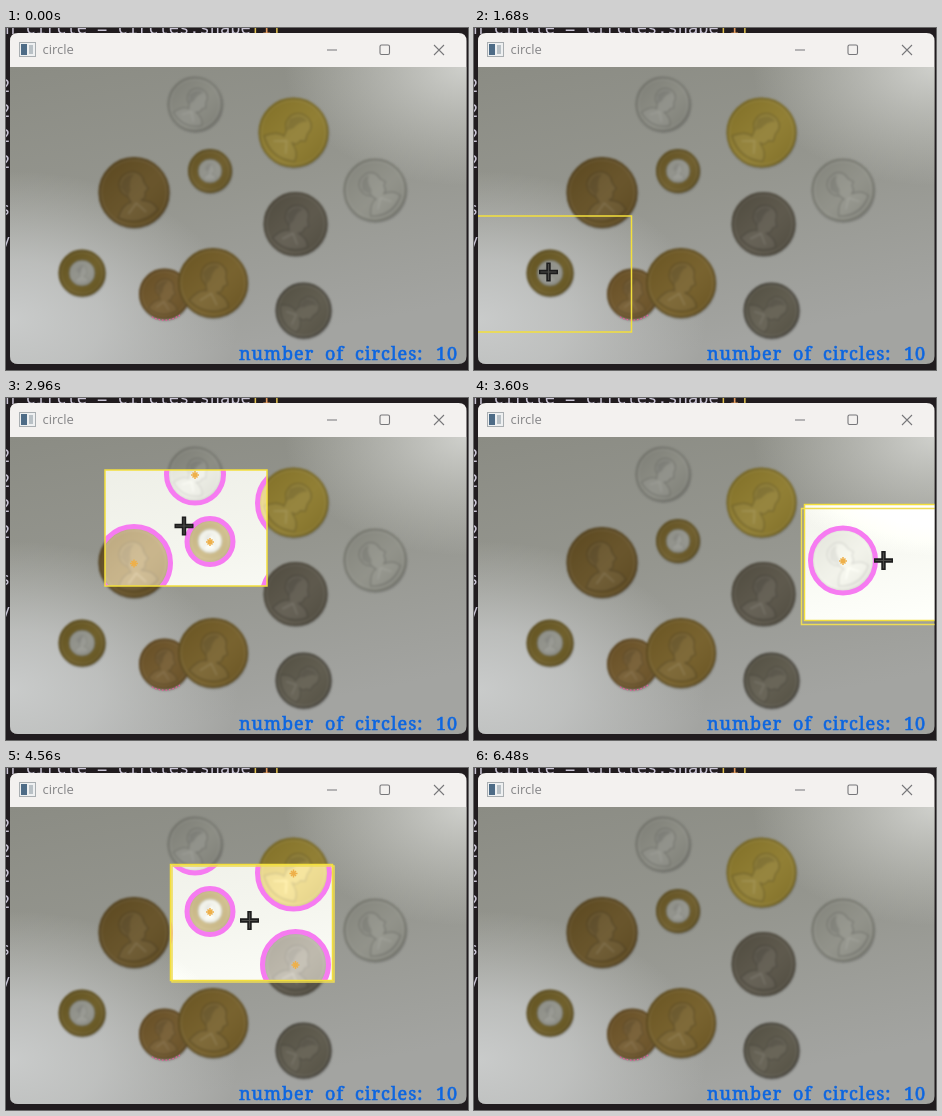
These frames come from a looping animation (462 by 342 pixels, 7.36 s). An HTML page:

```html
<!DOCTYPE html>
<html lang="en">
<head>
<meta charset="utf-8">
<title>circle</title>
<style>
  html, body { margin: 0; width: 100%; height: 100%; overflow: hidden; background: #211c1f; }
  svg { display: block; width: 462px; height: 342px; }
  .code { font: 17px "DejaVu Sans Mono", monospace; fill: #c9c4d4; white-space: pre; }
  .title { font: 13px "Open Sans", sans-serif; fill: #858587; }
  .count { font: 18px "Noto Serif", serif; letter-spacing: 1px; fill: #0d66e0; stroke: #0d66e0; stroke-width: .6px; }
</style>
</head>
<body>
<svg viewBox="0 0 462 342">
  <defs>
    <linearGradient id="paper" x1="0" y1="0" x2=".3" y2="1">
      <stop offset="0" stop-color="#8b8c84"/>
      <stop offset=".5" stop-color="#95968f"/>
      <stop offset="1" stop-color="#a3a4a1"/>
    </linearGradient>
    <radialGradient id="glow" cx="0" cy=".85" r=".5">
      <stop offset="0" stop-color="#ced0d0" stop-opacity=".9"/>
      <stop offset=".4" stop-color="#ced0d0" stop-opacity=".65"/>
      <stop offset="1" stop-color="#ced0d0" stop-opacity="0"/>
    </radialGradient>
    <radialGradient id="corner" cx="1" cy="0" r=".4">
      <stop offset="0" stop-color="#d2d3cf" stop-opacity=".95"/>
      <stop offset=".4" stop-color="#d2d3cf" stop-opacity=".55"/>
      <stop offset="1" stop-color="#d2d3cf" stop-opacity="0"/>
    </radialGradient>
    <linearGradient id="sheen" x1="0" y1="0" x2="1" y2="1">
      <stop offset="0" stop-color="#000" stop-opacity=".08"/>
      <stop offset=".55" stop-color="#fff" stop-opacity=".06"/>
      <stop offset="1" stop-color="#000" stop-opacity=".1"/>
    </linearGradient>
    <filter id="bright" x="0" y="0" width="1" height="1" color-interpolation-filters="sRGB">
      <feComponentTransfer>
        <feFuncR type="linear" slope="1" intercept=".38"/>
        <feFuncG type="linear" slope="1" intercept=".38"/>
        <feFuncB type="linear" slope="1" intercept=".38"/>
      </feComponentTransfer>
    </filter>
    <filter id="soft" color-interpolation-filters="sRGB"><feGaussianBlur stdDeviation="1"/></filter>
    <clipPath id="view"><path d="M4 39H460.500V328Q460.500 336 452 336H12Q4 336 4 328Z"/></clipPath>
    <clipPath id="lensClip"><rect id="lensArea" width="162" height="116"/></clipPath>
  </defs>

  <rect width="462" height="342" fill="#211c1f"/>
  <text class="code" x="-1" y="6">n circle = circles.shape<tspan fill="#e0c050">[</tspan><tspan fill="#e39a5c">1</tspan><tspan fill="#e0c050">]</tspan></text>
  <g id="margin" class="code"></g>

  <path d="M4 39V13Q4 5 12 5H452.500Q460.500 5 460.500 13V39Z" fill="#f3f1ef"/>
  <g>
    <rect x="13.500" y="14.500" width="16" height="14" fill="#eef0f1" stroke="#a9aeb1"/>
    <rect x="15" y="16" width="6" height="11" fill="#4d6b86"/>
    <rect x="23" y="17" width="4" height="9" fill="#b9c1c6"/>
  </g>
  <text class="title" x="36.500" y="26">circle</text>
  <path d="M321 22H331M428 17L438 27M438 17L428 27" fill="none" stroke="#77777a" stroke-width="1.100"/>
  <rect x="374" y="17" width="9.500" height="9.500" rx="1.500" fill="none" stroke="#77777a" stroke-width="1.100"/>

  <g clip-path="url(#view)">
    <g id="photo">
      <rect x="4" y="39" width="457" height="297" fill="url(#paper)"/>
      <rect x="4" y="39" width="457" height="297" fill="url(#glow)"/>
      <rect x="4" y="39" width="457" height="297" fill="url(#corner)"/>
      <g id="coins" filter="url(#soft)"></g>
      <path d="M146 289A26 26 0 0 0 174 287" fill="none" stroke="#e45a9c" stroke-width="1.300" stroke-dasharray="1.500 2"/>
    </g>
    <g id="lens">
      <g id="found" clip-path="url(#lensClip)">
        <use href="#photo" filter="url(#bright)"/>
        <g id="rings"></g>
      </g>
      <rect id="echo" width="162" height="116" fill="none" stroke="#eedc55" stroke-width="1.500"/>
      <rect id="frame" width="162" height="116" fill="none" stroke="#f3df3c" stroke-width="1.500"/>
    </g>
    <text class="count" y="332"><tspan x="233">number</tspan><tspan x="319">of</tspan><tspan x="349">circles:</tspan><tspan x="430">10</tspan></text>
    <g id="cursor" fill="none">
      <path d="M-9.500 0H9.500M0-9.500V9.500" stroke="#1d1d1d" stroke-width="4.400"/>
      <path d="M-8 0H8M0-8V8" stroke="#4b4b48" stroke-width="1.200"/>
    </g>
  </g>
</svg>

<script>
const LOOP = 7360, STEP = 80;
const $ = id => document.getElementById(id);

// x, y, radius, metal, rim, tilt of the relief, inner disc radius
const coins = [
  [189, 76, 27.5, '#85867d', '#74756d', 25, 0],
  [287.5, 104.5, 35, '#8a7728', '#76651f', 40, 0],
  [204, 143, 22, '#675522', '#5a4a1c', 0, 12],
  [128, 164.5, 35.5, '#604b1f', '#513e19', -12, 0],
  [369, 162, 31.5, '#8b8c83', '#77786f', -35, 0],
  [289.5, 196, 32, '#544f42', '#494438', 15, 0],
  [76, 245, 23.5, '#67561f', '#594918', 0, 13],
  [158.5, 266, 25.5, '#6b5124', '#59411a', 5, 0],
  [207, 255, 35, '#705922', '#5e4a1b', 10, 0],
  [297.5, 282.5, 28, '#575345', '#46433a', 60, 0]
];

// time, lens centre
const route = [
  [1440, 10, 300], [1600, 68, 251], [1680, 76.5, 246], [1840, 92, 242],
  [2160, 225, 285], [2320, 294.5, 305], [2480, 318, 285], [2800, 215, 190],
  [2960, 180, 130], [3120, 250, 112], [3280, 335, 125], [3520, 408.5, 168.5],
  [3600, 411.5, 164.5], [4000, 385, 250], [4160, 340, 270], [4480, 247, 156],
  [4560, 245.5, 154.5], [4720, 229, 144], [4960, 240, 158], [5280, 312.5, 188],
  [5600, 372, 225], [5840, 412, 275], [6160, 500, 370]
];

function relief(r, tilt) {
  return `<g transform="rotate(${tilt}) scale(${r / 36})">
    <path d="M-21 22Q-14 9-5 9L-7 3Q-15-2-13-12Q-9-22 3-21Q13-18 12-8L15-1L11 2Q11 9 5 9Q18 12 20 22Q0 36-21 22Z" fill="#fff" fill-opacity=".05" stroke="#000" stroke-opacity=".18" stroke-width="1.500"/>
    <path d="M-12-8Q-7-21 4-18Q-3-13-3-3L-7 3Z" fill="#000" fill-opacity=".12"/>
    <path d="M-10 20L0 11L8 22" fill="none" stroke="#fff" stroke-opacity=".1" stroke-width="2"/>
  </g>`;
}

$('coins').innerHTML = coins.map(([x, y, r, metal, rim, tilt, core]) =>
  `<g transform="translate(${x} ${y})">
    <circle cx=".5" cy="1" r="${r + .5}" fill="#333" fill-opacity=".25"/>
    <circle r="${r - 1}" fill="${metal}" stroke="${rim}" stroke-width="2"/>
    <circle r="${r - 3}" fill="none" stroke="#fff" stroke-opacity=".1"/>
    ${core ? `<circle r="${core}" fill="#8f9088" stroke="#666350"/>` : ''}
    ${relief(core || r, tilt)}
    <circle r="${r}" fill="url(#sheen)"/>
  </g>`).join('');

$('rings').innerHTML = coins.map(([x, y, r]) =>
  `<circle cx="${x}" cy="${y + .5}" r="${r + 1}" fill="none" stroke="#f67bf1" stroke-width="5"/>
   <path d="M${x - 4} ${y + 1}h8m-4-4v8m-2.500-6.500l5 5m0-5l-5 5" stroke="#eeb04a" stroke-width="1.500"/>`).join('');

$('margin').innerHTML = [['2', 64], ['2', 89], ['2', 114], ['2', 140], ['s', 187], ['y', 219]]
  .map(([c, y]) => `<text x="-6" y="${y}">${c}</text>`).join('');

function centreAt(t) {
  const i = route.findIndex(p => p[0] >= t);
  if (i < 0 || t < route[0][0]) return null;
  if (i === 0) return route[0].slice(1);
  const [t0, x0, y0] = route[i - 1], [t1, x1, y1] = route[i];
  const k = (t - t0) / (t1 - t0);
  return [x0 + (x1 - x0) * k, y0 + (y1 - y0) * k];
}

function place(rect, [x, y]) {
  rect.setAttribute('x', x - 81);
  rect.setAttribute('y', y - 58);
}

function show(el, on) { el.style.display = on ? '' : 'none'; }

function draw(time) {
  const t = Math.floor(time % LOOP / STEP) * STEP;
  const centre = centreAt(t);
  show($('lens'), centre);
  show($('cursor'), centre);
  if (!centre) return;

  place($('lensArea'), centre);
  place($('frame'), centre);
  show($('found'), t >= 1760);
  // A slow lens leaves its previous outline visible.
  const before = centreAt(t - STEP) || centre;
  place($('echo'), before);
  show($('echo'), Math.hypot(before[0] - centre[0], before[1] - centre[1]) < 6);
  $('cursor').setAttribute('transform', `translate(${centre[0] - 2} ${centre[1] - 2})`);
}

const start = performance.now();
function tick() {
  draw(performance.now() - start);
  requestAnimationFrame(tick);
}
tick();
</script>
</body>
</html>
```
